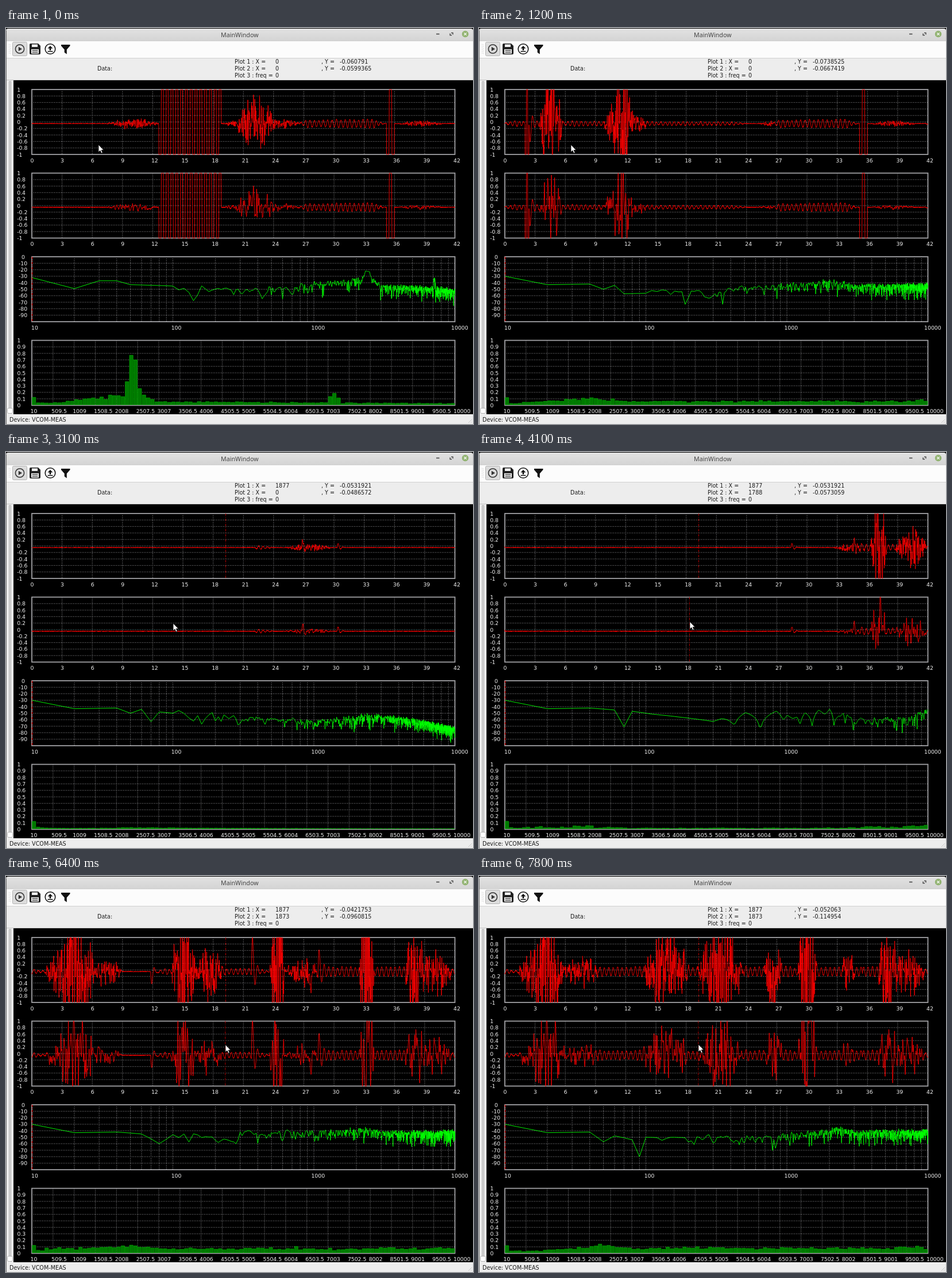
An HTML page that plays this animation: 813x689 px, repeating every 8000 ms.

```html
<!DOCTYPE html>
<html lang="en">
<head>
<meta charset="utf-8">
<title>MainWindow</title>
<style>
html, body { margin: 0; width: 100%; height: 100%; overflow: hidden; background: #000; }
svg { display: block; width: 813px; height: 689px; }
text { font: 9.6px "DejaVu Sans", sans-serif; fill: #1c1c1c; white-space: pre; }
.axis { font-size: 9.3px; fill: #f2f2f2; }
.title { font: 500 10.7px "Noto Sans", sans-serif; fill: #444; }
.grid { stroke: #a0a0a4; stroke-dasharray: 1 2; fill: none; }
.frame { stroke: #a0a0a4; stroke-width: 1.8; fill: none; }
.mark { stroke: #b00000; stroke-dasharray: 4 2 1 2; }
.trace { fill: none; stroke: #f00; stroke-width: .9; stroke-linejoin: bevel; }
.crisp { shape-rendering: crispEdges; }
</style>
</head>
<body>
<svg viewBox="0 0 813 689" xmlns="http://www.w3.org/2000/svg">
  <defs>
    <linearGradient id="bar" x2="0" y2="1"><stop stop-color="#e2e2e2"/><stop offset="1" stop-color="#d4d4d4"/></linearGradient>
  </defs>
  <rect y="4" width="813" height="685" fill="#ededed"/>
  <path d="M0 22V4Q0 1 4 1H809Q813 1 813 4V22Z" fill="url(#bar)"/>
  <rect y="22" width="813" height="30" fill="#fcfcfc"/>
  <path class="crisp" d="M0 22.5H813M0 52.5H813" stroke="#d0d0d0"/>
  <text class="title" x="374" y="16">MainWindow</text>
  <g stroke="#444" fill="none">
    <path d="M749 10.5H754.500" stroke-width="1.6"/>
    <path d="M775 8.500H778V11.500M776 12.500H773V9.500" stroke-width="1.3"/>
  </g>
  <circle cx="799.5" cy="10.5" r="5.7" fill="#92b372"/>
  <path d="M797.300 8.300L801.700 12.700M801.700 8.300L797.300 12.700" stroke="#fff" stroke-width="1.2"/>

  <path d="M5.500 28V46M7.500 29V46" stroke="#c8c8c8" stroke-dasharray="1 2"/>
  <rect x="11.5" y="24.5" width="25" height="24" rx="2" fill="#dcdcdc" stroke="#b4b4b4"/>
  <circle cx="24" cy="36.500" r="7.600" fill="none" stroke="#333" stroke-width="1.5"/>
  <path d="M21.800 32.800L28 36.500L21.800 40.200Z" fill="#333"/>
  <path fill="#222" fill-rule="evenodd" d="M41 29Q41 27 43 27H56L60 31V44Q60 46 58 46H43Q41 46 41 44ZM45 28.500V33H55V28.500ZM44 37V44.500H57V37ZM45.500 38.500H55.500V39.700H45.500ZM45.500 41.500H55.500V42.700H45.500Z"/>
  <circle cx="77" cy="36.500" r="8.800" fill="none" stroke="#111" stroke-width="1.6"/>
  <path d="M77 31L81.500 35.500H78.300V39H75.700V35.500H72.500ZM72.500 40H81.500V41.600H72.500Z" fill="#111"/>
  <path d="M96 29H111.500V31L105.800 37.500V45.500L101.700 42.500V37.500L96 31Z" fill="#111"/>

  <g id="info"></g>

  <rect x="13" y="91" width="800" height="581" fill="#000"/>
  <path class="crisp" d="M0 90.5H813" stroke="#c4c4c4"/>
  <rect x="5.5" y="92.500" width="3" height="570" rx="1.500" fill="#d6d6d6" stroke="#b4b4b4"/>
  <rect x="2.5" y="661.500" width="9" height="9" rx="2" fill="#fff" stroke="#b0b0b0"/>
  <path class="crisp" d="M.5 4V689" stroke="#6c6c6c"/>
  <text x="6" y="685">Device: VCOM-MEAS</text>
  <path d="M805 687L811 681M809 687L811 685" stroke="#c6c6c6"/>
  <g id="plots"></g>
  <path id="mouse" d="M0 0V13L3 10.300L5 15L7.200 14L5.200 9.600H9.200Z" fill="#fff" stroke="#000" stroke-width=".8"/>
</svg>
<script>
const LEFT = 45, WIDTH = 736.5, HEIGHT = 113;
const TOPS = [0, 1, 2, 3].map(i => 107 + 145.5 * i);
const SAMPLES = 4096, SPAN = 42, RATE = SAMPLES / SPAN;
const LOOP = 8000, TICK = 100;
const $ = id => document.getElementById(id);

function el(name, attrs, parent, text) {
  const e = document.createElementNS('http://www.w3.org/2000/svg', name);
  for (const k in attrs) e.setAttribute(k, attrs[k]);
  if (text !== undefined) e.textContent = text;
  return parent.appendChild(e);
}
const clamp = (v, a, b) => Math.min(b, Math.max(a, v));
const mix = (a, b, k) => a + (b - a) * k;
const steps = (n, fn) => Array.from({ length: n }, (_, k) => fn(k));
const rnd = n => { const v = Math.sin(n * 12.9898 + 4.137) * 43758.5453; return v - Math.floor(v); };

// Piecewise linear curve through flat x, y pairs
function curve(p, x) {
  if (x <= p[0]) return p[1];
  for (let i = 2; i < p.length; i += 2)
    if (x <= p[i]) return mix(p[i - 1], p[i + 1], (x - p[i - 2]) / (p[i] - p[i - 2]));
  return p[p.length - 1];
}
// Smooth noise in -1..1; a higher power makes tall peaks rarer
function grain(u, seed, power = 1) {
  const n = Math.floor(u);
  const at = m => { const r = rnd(m + seed) * 2 - 1; return Math.sign(r) * Math.abs(r) ** power; };
  return mix(at(n), at(n + 1), u - n);
}

// ---- input signal: events along an endless sweep, 42 units per screen ----
const events = [];
let base = 0;
const add = (from, to, wave) => events.push({ from: base + from, to: base + to, wave });

// The second channel is a smoothed, weaker copy of the first
function burst(from, to, a) {
  add(from, to, (k, u, ch) => Math.sin(Math.PI * k) * a *
    (ch ? .7 * grain(u * 16, 300, 1.5) : grain(u * 36, 700, 1.5)));
}
function wiggle(from, to, a) {
  add(from, to, (k, u) => a * Math.min(1, 3 * Math.sin(Math.PI * k)) * Math.sin(u * 14.3) *
    (.75 + .5 * rnd(Math.floor(u * 2.276))));
}
function tone(from, to, cycles) {
  add(from, to, k => -4 * Math.sin(k * cycles * 2 * Math.PI));
}
function knock(at, a) {
  add(at - .2, at + .5, k => a * Math.sin(k * 9) * Math.exp(-3 * k));
}

base = -42;
burst(7.4, 12.7, .2);
tone(12.6, 18.8, 13);
burst(18.7, 27, .25);
burst(20.3, 24, .75);
wiggle(26.5, 35, .11);
tone(35.2, 36, 1.5);
burst(36.2, 41, .1);

base = 0;
wiggle(-.5, 14, .07);
tone(2, 2.4, 1.5);
knock(2.6, -.8);
burst(3.4, 5.8, 1.8);
burst(9.8, 10.8, .6);
burst(10.5, 12.8, 2.2);
burst(12.4, 14.2, .3);
wiggle(13, 24, .05);
burst(25, 30, .12);
knock(27, .4);
knock(30.5, .2);

base = 42;
knock(28.6, .2);
burst(32.6, 36.4, .14);
knock(34.8, .45);
wiggle(34.5, 39, .1);
burst(36.3, 37.9, 2);
burst(38.7, 42, .75);

base = 84;
wiggle(-.5, 9, .08);
knock(2.3, .8);
burst(3.8, 6.2, 2.2);
burst(5.8, 9, .5);
knock(12, -.6);
burst(13.8, 16.4, 2.4);
burst(16.2, 19, 1);
wiggle(12, 23.8, .08);
knock(22, 1.7);
burst(23.6, 25.1, 4);
burst(25, 28.6, .4);
knock(27.8, -1);
knock(28.6, 1);
wiggle(25, 43, .13);
burst(32.5, 34, 4);
burst(37, 39, 1.5);
burst(38.4, 41.8, .8);

base = 126;
wiggle(0, 42, .14);
burst(1.2, 6.2, 1.1);
burst(3, 5.6, 1.2);
burst(5.4, 9.6, .45);
burst(13.6, 18.4, 1.4);
burst(19, 23.8, 1.8);
burst(25.7, 27.6, 1.4);
burst(29.1, 31, 5);
burst(33.4, 34.8, .7);

const FIRST = Math.round(-46 * RATE), LAST = Math.round(164 * RATE);
const signal = [0, 1].map(ch => {
  const out = Float32Array.from({ length: LAST - FIRST + 1 }, (_, n) => -.05 + (rnd(n + ch * 9999) - .5) * .025);
  for (const { from, to, wave } of events) {
    const end = Math.min(LAST, to * RATE);
    for (let n = Math.max(FIRST, Math.ceil(from * RATE)); n <= end; n++) {
      const u = n / RATE;
      out[n - FIRST] += wave((u - from) / (to - from), u, ch);
    }
  }
  return out;
});
const position = t => curve([0, -1, 1200, 26.5, 4100, 84, 5300, 107.7, 7800, 161.5], t);

// ---- spectrum: time, ripple speed, envelope as Hz, dB pairs ----
const START = [10, -30, 20, -43, 40, -42];
const scenes = [];
const scene = (t, speed, env) => scenes.push({ t, speed, env });
scene(0, .4, [10, -32, 20, -49, 30, -37, 40, -37, 50, -43, 120, -46, 140, -66, 160, -52, 300, -53, 1000, -45,
  2000, -38, 2250, -33, 2320, -22, 2480, -23, 2560, -37, 3000, -49, 7000, -52, 7100, -34, 7180, -34, 7300, -52, 10000, -57]);
scene(1200, .4, [...START, 50, -50, 60, -44, 70, -57, 180, -54, 190, -74, 210, -58, 500, -50, 2000, -41, 3000, -48, 10000, -47]);
scene(3100, .5, [...START, 50, -50, 60, -44, 70, -63, 80, -48, 100, -50, 300, -62, 1000, -66, 2400, -57, 10000, -78]);
scene(4100, .06, [...START, 60, -45, 70, -71, 80, -47, 100, -50, 300, -64, 450, -52, 950, -52, 1100, -59, 2000, -47, 2900, -61, 7000, -62, 10000, -48]);
scene(5300, .45, [...START, 60, -44, 90, -58, 100, -48, 200, -51, 220, -72, 240, -57, 500, -48, 1000, -50, 2400, -44, 10000, -45]);
scene(6400, .45, [...START, 60, -45, 80, -60, 100, -46, 200, -52, 280, -62, 305, -46, 500, -46, 2350, -41, 3000, -46, 10000, -45]);
scene(7800, .45, [...START, 50, -57, 60, -48, 80, -54, 90, -80, 100, -50, 200, -56, 300, -49, 400, -56, 1000, -49, 2350, -39, 3000, -45, 10000, -44]);

// Level of each 10 Hz bin: blended envelopes plus fading, from which strong tones are free
function levels(t) {
  let j = 0;
  while (j < scenes.length - 2 && t >= scenes[j + 1].t) j++;
  const a = scenes[j], b = scenes[j + 1], k = clamp((t - a.t) / (b.t - a.t), 0, 1);
  const speed = mix(a.speed, b.speed, k);
  return steps(1000, i => {
    const hz = 10 * (i + 1), v = mix(curve(a.env, hz), curve(b.env, hz), k);
    if (hz < 110) return v;
    const x = i * speed, fade = grain(x, t * .37) ** 2 + grain(x, t * .53 + 50) ** 2;
    return v + clamp((-28 - v) / 10, 0, 1) * (5 + 10 * Math.log10(Math.max(fade, .004)));
  });
}

// ---- static plot furniture ----
const plots = $('plots');
const hzX = f => LEFT + WIDTH / 3 * Math.log10(f / 10);
const label = (x, y, s) => el('text', { class: 'axis', x, y: y + 3.5 }, plots, s);

function drawAxes(i, xs, dx, mark) {
  const y = TOPS[i], rows = steps(9, k => y + HEIGHT * (k + 1) / 10);
  const d = xs.map(x => `M${x} ${y}v${HEIGHT}`).concat(rows.map(r => `M${LEFT} ${r}h${WIDTH}`)).join('');
  el('path', { class: 'grid', d }, plots);
  el('rect', { class: 'frame', x: LEFT, y, width: WIDTH, height: HEIGHT }, plots);
  for (let k = 0; k <= 10; k++) if (i !== 2 || k < 10) label(k ? dx : Math.max(dx, i === 2 ? 27 : dx), y + HEIGHT * k / 10, mark(k));
}
const columns = n => steps(n - 1, k => LEFT + WIDTH * (k + 1) / n);
const scale = (i, n, text) => {
  for (let k = 0; k <= n; k++) label(LEFT - 2.5 + WIDTH * k / n, TOPS[i] + 123, text(k));
};
for (const i of [0, 1]) {
  drawAxes(i, columns(14), 19.2, k => (5 - k) / 5);
  scale(i, 14, k => k * 3);
}
drawAxes(2, steps(26, k => hzX(((k + 1) % 9 + 1) * 10 ** (1 + Math.floor((k + 1) / 9)))), 22, k => String(-10 * k));
for (let k = 0; k < 4; k++) label(LEFT - 1 - 1.8 * k + WIDTH * k / 3, TOPS[2] + 123, 10 ** (k + 1));
drawAxes(3, columns(20), 19.5, k => (10 - k) / 10);
scale(3, 20, k => 10 + 499.5 * k);

const marks = [0, 1].map(() => el('path', { class: 'mark' }, plots));
const traces = [0, 1].map(() => el('path', { class: 'trace' }, plots));
const spectrum = el('path', { class: 'trace', style: 'stroke:#0f0' }, plots);
const bars = el('path', { fill: '#007a00', stroke: '#00a000', 'stroke-width': .8 }, plots);
el('path', { d: `M45.5 ${TOPS[2]}v${HEIGHT}`, stroke: '#f00', 'stroke-dasharray': '4 2 1 2' }, plots);

// ---- header readout ----
const note = (x, y, s) => el('text', { x, y }, $('info'), s);
note(159, 74, 'Data:');
const readX = [], readY = [];
for (const i of [0, 1]) {
  const y = 62 + 12 * i;
  note(398, y, `Plot ${i + 1} : X =`);
  note(549, y, ', Y =');
  readX.push(note(469, y, ''));
  readY.push(note(581, y, ''));
}
note(398, 86, 'Plot 3 : freq =');
note(469, 86, '0');

const pick = (rows, t) => rows.filter(r => r[0] <= t).pop()[1];
const cursorX = [[[0, 0], [2300, 1877]], [[0, 0], [3600, 1788], [4500, 1873]]];
const cursorY = [
  [[0, '-0.060791'], [100, '-0.0738525'], [2300, '-0.0531921'], [5100, '-0.0421753'], [7100, '-0.052063']],
  [[0, '-0.0599365'], [100, '-0.0667419'], [2000, '-0.0486572'], [3600, '-0.0573059'], [5100, '-0.0960815'], [7100, '-0.114954']]
];

// ---- drawing ----
const line = pts => 'M' + pts.map(([x, y]) => `${x.toFixed(1)} ${y.toFixed(1)}`).join('L');

function drawTrace(i, pos) {
  const now = Math.floor(pos * RATE), mid = TOPS[i] + HEIGHT / 2;
  traces[i].setAttribute('d', line(steps(SAMPLES, s => {
    const n = s + SAMPLES * Math.floor((now - s) / SAMPLES);
    const v = clamp(signal[i][Math.max(0, n - FIRST)], -1, 1);
    return [LEFT + WIDTH * s / SAMPLES, mid - v * HEIGHT / 2];
  })));
}

function drawSpectrum(t) {
  const db = levels(t);
  spectrum.setAttribute('d', line(db.map((v, i) => [hzX(10 * (i + 1)), TOPS[2] - clamp(v, -100, 0) * HEIGHT / 100])));

  // Each bar is the RMS of ten bins
  const w = WIDTH / 100, floor = TOPS[3] + HEIGHT - 1;
  bars.setAttribute('d', steps(100, n => {
    const power = db.slice(n * 10, n * 10 + 10).reduce((sum, v) => sum + 10 ** (v / 10), 0);
    const h = Math.sqrt(power * 10) * HEIGHT;
    return `M${(LEFT + n * w + .6).toFixed(1)} ${floor}v${(-h).toFixed(1)}h${(w - 1.2).toFixed(1)}V${floor}Z`;
  }).join(''));
}

const mouseX = [0, 161, 1200, 160, 1800, 160, 2300, 383, 3100, 291, 3600, 367, 4200, 367, 4500, 382];
const mouseY = [0, 203, 1800, 203, 2300, 168, 3100, 298, 4500, 294, 7800, 293];

function draw(t) {
  const pos = position(t);
  for (const i of [0, 1]) {
    const x = pick(cursorX[i], t);
    readX[i].textContent = x;
    readY[i].textContent = pick(cursorY[i], t);
    marks[i].setAttribute('d', x ? `M${LEFT + WIDTH * x / SAMPLES} ${TOPS[i]}v${HEIGHT}` : '');
    drawTrace(i, pos);
  }
  drawSpectrum(t);
  $('mouse').setAttribute('transform', `translate(${curve(mouseX, t)} ${curve(mouseY, t)})`);
}

// Ticks on which the display stalls
const stalled = t => (t >= 2500 && t <= 3000) ||
  [500, 900, 3800, 4200, 5600, 6100, 6500, 7000, 7400, 7900].includes(t);
const start = performance.now();
let shown = -1;
function run() {
  let t = Math.floor((performance.now() - start) % LOOP / TICK) * TICK;
  while (stalled(t)) t -= TICK;
  if (t !== shown) draw(shown = t);
  requestAnimationFrame(run);
}
run();
</script>
</body>
</html>
```
